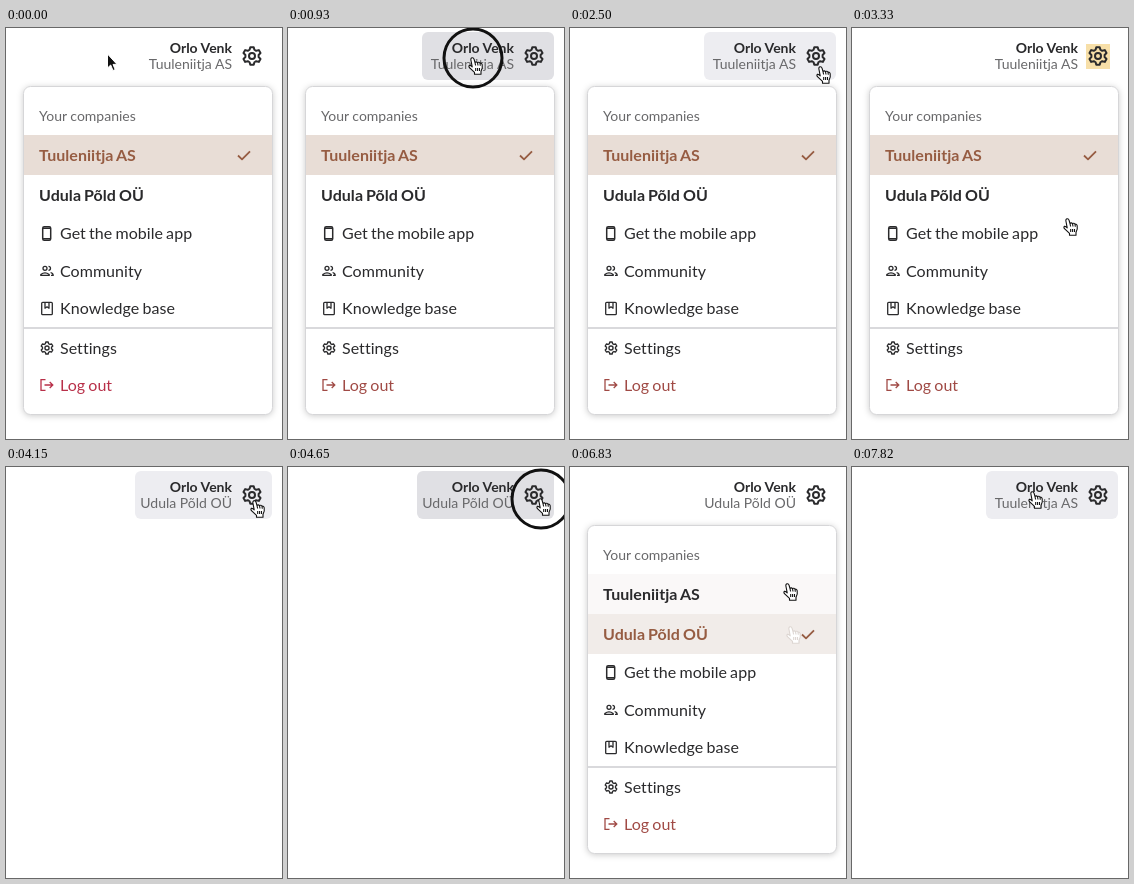
Animation of 276x411 px, one loop 8 s. Source, as an HTML page:

```html
<!DOCTYPE html>
<html lang="en">
<head>
<meta charset="utf-8">
<title>Company menu</title>
<style>
  html, body { margin: 0; width: 100%; height: 100%; overflow: hidden; background: #fff; }
  svg { display: block; width: 276px; height: 411px; font-family: Lato, sans-serif; fill: #2a2a2c; }
  text { font-variant-ligatures: none; }
  .item { font-size: 16px; letter-spacing: .05px; word-spacing: -1px; }
  .bold { font-weight: 700; }
  .small { font-size: 14px; }
  .grey { fill: #68686a; }
  .end { text-anchor: end; }
  .line { fill: none; stroke: #2a2a2c; stroke-width: 1.5; stroke-linejoin: round; }
  .thin { stroke-width: 1.3; }
  .brown { stroke: #965c42; stroke-width: 1.8; }
  .gear { stroke-width: 2; }
  .panel { fill: #fff; stroke: #d6d6d8; filter: drop-shadow(0 1px 3px rgba(0, 0, 0, .2)); }
</style>
</head>
<body>
<svg viewBox="0 0 276 411">
  <defs>
    <g id="gear" class="line gear"><path id="teeth"/><circle r="3"/></g>
    <path id="hand" stroke-width="1.1" stroke-linejoin="round"
      d="M4.200 9.800 2.900 3Q2.600 1 4.100 .8T6.100 2.300L7 5.500Q8.400 4.200 9.500 5.600 11 4.600 12 6.200 13.800 5.800 14.200 7.800 14.900 11.500 13 14.400V17.300H6.500V15.400L2 11.200Q.2 9.200 1.300 8.400 2.600 8 4.200 9.800ZM7 5.500 7.600 8.500M9.500 5.600 10 8.500M12 6.200 12.300 8.700M7.700 11V14M9.600 11V14M11.500 11V14"/>
    <path id="arrow" d="M.5 0V14L3.700 11 6 16.500 8.200 15.600 6 10.400H10Z"/>
  </defs>

  <rect id="header" y="4" height="48" rx="6"/>
  <text id="user" class="small bold end" x="226" y="25">Orlo Venk</text>
  <text id="current" class="small grey end" x="226" y="41"></text>
  <rect id="glow" x="234" y="16" width="24" height="25" fill="#f7dfa8"/>
  <use href="#gear" x="246" y="28"/>

  <g id="menu">
    <rect class="panel" x="17.500" y="58.500" width="249" height="328" rx="7"/>
    <text class="small grey" x="33" y="93">Your companies</text>
    <rect class="row" x="18" y="107" width="248" height="40"/>
    <rect class="row" x="18" y="147" width="248" height="40"/>
    <text class="item bold company" x="33" y="133"></text>
    <text class="item bold company" x="33" y="173"></text>
    <path id="check" class="line brown" d="M232 127.500 236 131.300 244 123.300"/>

    <rect class="line" x="36.700" y="198.800" width="8" height="13.400" rx="1.500"/>
    <path class="line" d="M37 200.300H44.500M37 210.700H44.500"/>
    <text class="item" x="54" y="211">Get the mobile app</text>

    <g class="line thin">
      <circle cx="39" cy="240.300" r="2"/>
      <path d="M34.800 247.400V246.500Q39 243.300 43.200 246.500V247.400ZM42.500 238.300A2 2 0 0 1 42.500 242.300M44.600 244.500Q47.200 245.300 47.200 247.400H45"/>
    </g>
    <text class="item" x="54" y="249">Community</text>

    <g class="line thin">
      <rect x="35.700" y="274.300" width="10.600" height="12.400" rx="1"/>
      <path d="M39 274.500V280.200L41 278.800 43 280.200V274.500"/>
    </g>
    <text class="item" x="54" y="286">Knowledge base</text>

    <rect x="18" y="299" width="248" height="2" fill="#d9d9dc"/>
    <use href="#gear" transform="translate(41 320) scale(.68)"/>
    <text class="item" x="54" y="326">Settings</text>

    <g id="logout">
      <path fill="none" stroke="currentColor" stroke-width="1.300" d="M39.500 351.700H35V362.300H39.500M38.500 357H46.500M43.700 354 46.800 357 43.700 360"/>
      <text class="item" x="54" y="363" fill="currentColor">Log out</text>
    </g>
  </g>

  <use id="ghost" href="#hand" x="216" y="159" fill="#fff" stroke="#ddd6d2"/>
  <circle id="ring" r="29" fill="none" stroke="#111" stroke-width="3"/>
  <use id="cursor"/>
</svg>

<script>
const LOOP = 8000;
const companies = ['Tuuleniitja AS', 'Udula Põld OÜ'];
const headerFill = ['none', '#ededf1', '#e0e0e4'];
const pointers = {
  arrow: { href: '#arrow', fill: '#111', stroke: '#fff' },
  hand: { href: '#hand', fill: '#fff', stroke: '#111' },
};

// [time, cursor x, cursor y, changes]; changes persist until overridden
const steps = [
  [0, 101, 26, { open: 1, header: 0, company: 0, hover: -1, pointer: 'arrow', red: 1 }],
  [130, 118, 26, { red: 0 }],
  [500, 146, 32, { header: 1, pointer: 'hand' }],
  [670, 170, 31, {}],
  [830, 180, 29, { header: 2, ring: 1 }],
  [1000, 180, 29, { open: 0 }],
  [1170, 180, 29, { header: 1, ring: 0 }],
  [1920, 180, 29, { open: 1 }],
  [2170, 226, 29, {}],
  [2330, 246, 30, { header: 2, ring: 1 }],
  [2500, 246, 38, { header: 1, ring: 0 }],
  [2670, 232, 110, { header: 0 }],
  [3000, 214, 188, {}],
  [3330, 211, 190, { glow: 1 }],
  [3500, 211, 160, { glow: 0, hover: 1, ring: 1 }],
  [3700, 214, 110, { open: 0, company: 1, hover: -1, ring: 0 }],
  [3880, 230, 40, { header: 1 }],
  [4150, 244, 33, {}],
  [4320, 248, 31, {}],
  [4500, 248, 31, { header: 2, ring: 1 }],
  [4870, 248, 31, { header: 1, ring: 0, open: 1 }],
  [5000, 247, 40, {}],
  [5150, 234, 150, { header: 0 }],
  [5330, 208, 321, {}],
  [5670, 211, 265, {}],
  [5850, 215, 195, {}],
  [6170, 216, 172, { hover: 1 }],
  [6500, 216, 159, {}],
  [6830, 213, 116, { hover: 0, ghost: 1 }],
  [7000, 213, 116, { ghost: 0 }],
  [7330, 213, 116, { ring: 1 }],
  [7500, 206, 76, { open: 0, company: 0, hover: -1, ring: 0 }],
  [7650, 186, 40, { header: 1 }],
  [7820, 176, 24, {}],
];

const $ = id => document.getElementById(id);
const rows = document.querySelectorAll('.row');
const names = document.querySelectorAll('.company');
const show = (id, on) => { $(id).style.display = on ? '' : 'none'; };
const set = (el, attrs) => Object.entries(attrs).forEach(([k, v]) => el.setAttribute(k, v));

function gearPath() {
  const points = [];
  const corners = [[-21, 6.7], [-11, 9], [11, 9], [21, 6.7]];
  for (let tooth = 0; tooth < 6; tooth++) {
    for (const [offset, r] of corners) {
      const a = (tooth * 60 + offset - 90) * Math.PI / 180;
      points.push(`${(r * Math.cos(a)).toFixed(2)} ${(r * Math.sin(a)).toFixed(2)}`);
    }
  }
  return `M${points.join('L')}Z`;
}

function rowFill(index, s) {
  if (index === s.company) return s.ghost ? '#f1ece9' : '#e8ddd6';
  return index === s.hover ? '#faf8f8' : 'none';
}

function render(s) {
  const left = s.company ? 129 : 134;
  set($('header'), { x: left, width: 266 - left, fill: headerFill[s.header] });
  $('current').textContent = companies[s.company];
  rows.forEach((row, i) => row.setAttribute('fill', rowFill(i, s)));
  names.forEach((name, i) => name.setAttribute('fill', i === s.company ? '#965c42' : '#2a2a2c'));
  $('check').setAttribute('transform', `translate(0 ${s.company * 40})`);
  $('logout').style.color = s.red ? '#b83049' : '#a04a45';
  show('menu', s.open);
  show('glow', s.glow);
  show('ghost', s.ghost);
  show('ring', s.ring);
  set($('ring'), { cx: s.x + 5, cy: s.y + 1 });
  set($('cursor'), { ...pointers[s.pointer], x: s.x, y: s.y });
}

let state = {};
const states = steps.map(([time, x, y, changes]) => (state = { ...state, ...changes, time, x, y }));

set($('teeth'), { d: gearPath() });
names.forEach((name, i) => { name.textContent = companies[i]; });

const start = performance.now();
let shown;
function tick() {
  const t = (performance.now() - start) % LOOP;
  const next = states.filter(s => s.time <= t).pop();
  if (next !== shown) render(shown = next);
  requestAnimationFrame(tick);
}
tick();
</script>
</body>
</html>
```
